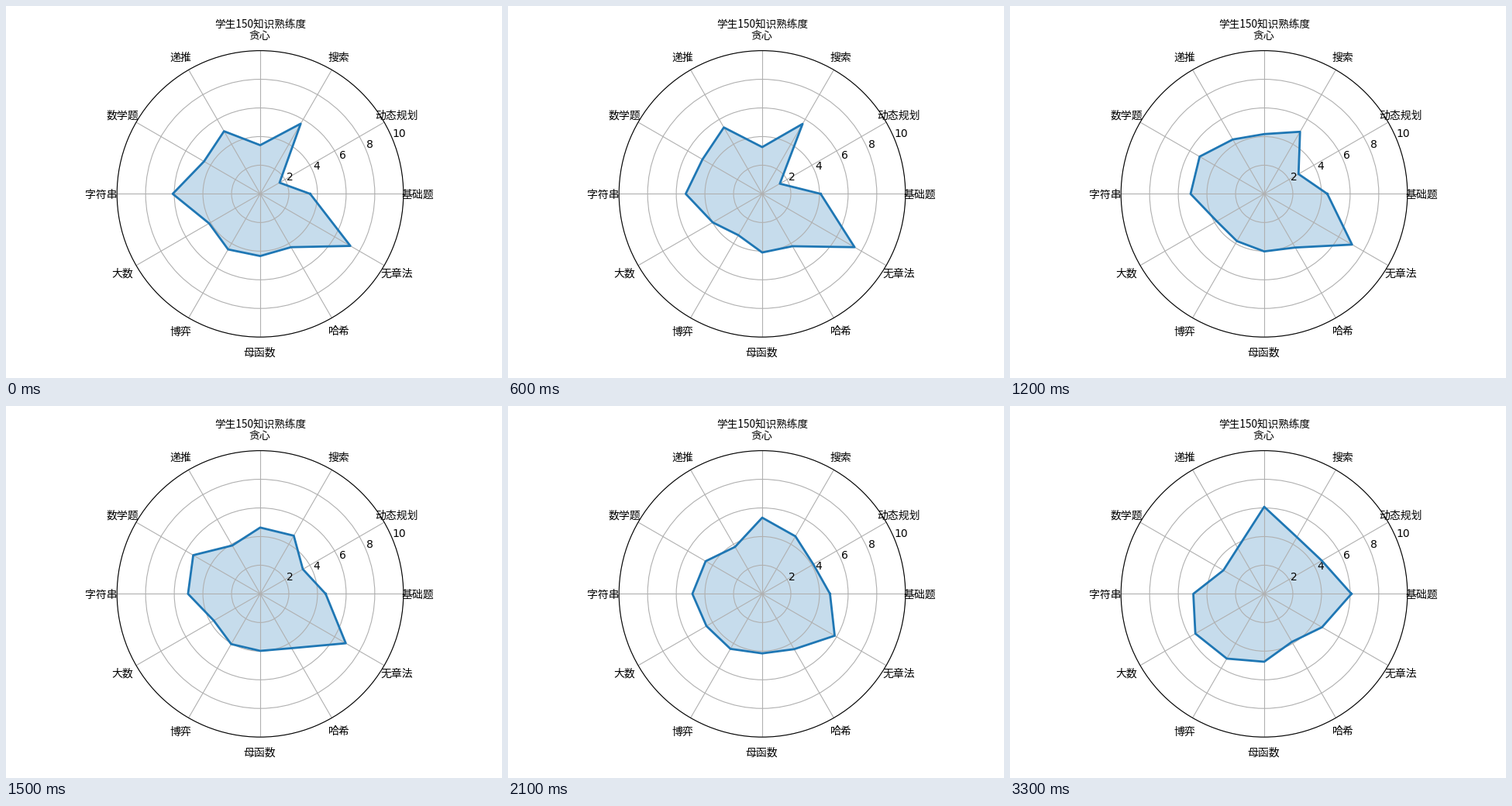
Animation of 640x480 px, one loop 3.6 s. Source, as a matplotlib script:

```python
import numpy as np
import matplotlib.pyplot as plt
from matplotlib.animation import FuncAnimation

FRAMES, INTERVAL = 12, 300
BLUE = "#1f77b4"
CJK = dict(family="Noto Sans CJK JP", ha="center", va="center")

# Each topic glides in straight legs through its score at these steps.
KEY_STEPS = [0, 1, 5, 9, 11]
TOPICS = {
    "基础题": (3.49, 3.92, 4.57, 4.90, 6.09),
    "动态规划": (1.56, 0.75, 3.44, 4.81, 4.64),
    "搜索": (5.66, 5.96, 4.69, 4.59, 4.57),
    "贪心": (3.40, 2.81, 4.63, 6.01, 6.08),
    "递推": (5.05, 5.84, 3.90, 3.68, 3.70),
    "数学题": (4.53, 4.62, 5.40, 3.72, 3.29),
    "字符串": (6.11, 5.44, 5.04, 4.71, 4.95),
    "大数": (4.12, 4.07, 3.74, 5.25, 5.55),
    "博弈": (4.48, 3.09, 4.05, 4.82, 5.22),
    "母函数": (4.34, 4.13, 3.98, 4.33, 4.74),
    "哈希": (4.30, 4.17, 4.38, 4.54, 3.87),
    "无章法": (7.27, 7.63, 6.90, 4.79, 4.66),
}

angles = np.linspace(0, 2 * np.pi, len(TOPICS), endpoint=False)
ring = np.append(angles, angles[0])

fig = plt.figure(figsize=(6.4, 4.8), dpi=100)
ax = fig.add_subplot(111, polar=True)
ax.set_rlim(0, 10)
ax.set_rticks(range(2, 11, 2))
ax.set_thetagrids(np.degrees(angles), [""] * len(TOPICS))

for angle, topic in zip(angles, TOPICS):
    ax.annotate(topic, (angle, 11.05), xytext=(-0.5, -0.9),
                textcoords="offset points", size=10, annotation_clip=False, **CJK)
fig.text(328 / 640, 1 - 24.5 / 480, "学生150知识熟练度", size=9.8, **CJK)

line, = ax.plot([], [], color=BLUE, lw=2)
area, = ax.fill(ring, np.zeros_like(ring), color=BLUE, alpha=0.25)


def draw(step):
    scores = [np.interp(step, KEY_STEPS, path) for path in TOPICS.values()]
    scores.append(scores[0])
    line.set_data(ring, scores)
    area.set_xy(np.column_stack([ring, scores]))
    return line, area


anim = FuncAnimation(fig, draw, frames=FRAMES, interval=INTERVAL,
                     repeat=True, repeat_delay=0)
plt.show()
```
